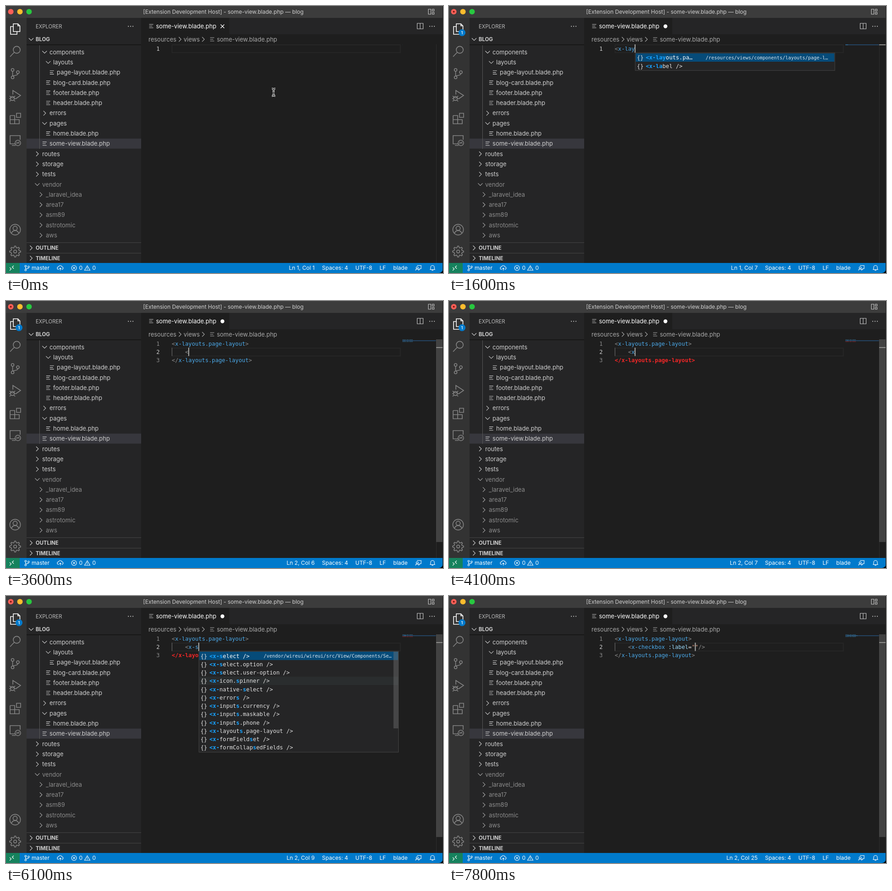
An HTML page for the animation above (8 s loop, 957x585 px).

```html
<!DOCTYPE html>
<html lang="en">
<head>
<meta charset="utf-8">
<title>Editor autocompletion</title>
<style>
  html, body { margin: 0; height: 100%; overflow: hidden; background: #1e1e1e; }
  svg { display: block; width: 100vw; height: 100vh; }
  text { font-family: Inter, Roboto, sans-serif; white-space: pre; }
  .mono { font-family: "DejaVu Sans Mono", "Liberation Mono", monospace; }
</style>
</head>
<body>
<svg viewBox="0 0 957 585"><g id="frame"></g><g id="live"></g></svg>
<script>
const LOOP = 8000, BLINK = 500;
const CODE = 12.175, CHAR = 7.33, ROW = 18.26, CODE_X = 363, TOP = 84;

const esc = s => s.replace(/&/g, '&amp;').replace(/</g, '&lt;');
const rect = (x, y, w, h, fill, extra = '') =>
  `<rect x="${x}" y="${y}" width="${w}" height="${h}" fill="${fill}" ${extra}/>`;
const dot = (x, y, r, fill) => `<circle cx="${x}" cy="${y}" r="${r}" fill="${fill}"/>`;
const text = (x, y, html, { size = 13, fill = '#d0d0d0', weight = 400, anchor = 'start', cls = '' } = {}) =>
  `<text class="${cls}" x="${x}" y="${y + size * 0.36}" font-size="${size}" fill="${fill}" font-weight="${weight}" text-anchor="${anchor}">${html}</text>`;
const mono = (x, y, html, options) => text(x, y, html, { size: CODE, fill: '#e2e2e2', cls: 'mono', ...options });
const icon = (x, y, d, color = '#ccc', width = 1.1) =>
  `<path transform="translate(${x} ${y})" d="${d}" fill="none" stroke="${color}" stroke-width="${width}"/>`;
const ring = (x, y, r) => `M${x - r} ${y}a${r} ${r} 0 1 0 ${2 * r} 0a${r} ${r} 0 1 0 ${-2 * r} 0`;

const RIGHT = 'M-2.5-5L2.5 0L-2.5 5', DOWN = 'M-5-2.5L0 2.5L5-2.5';
const FILE = 'M-4.5-3.8h9M-4.5 0h7M-4.5 3.8h9';
const ellipsis = (x, y) => [-5, 0, 5].map(d => dot(x + d, y, 1.1, '#ccc')).join('');

function gear() {
  const points = [];
  for (let i = 0; i < 32; i++) {
    const radius = i % 4 < 2 ? 12 : 8.8, angle = (i - 0.5) * Math.PI / 16;
    points.push(`${(radius * Math.cos(angle)).toFixed(2)} ${(radius * Math.sin(angle)).toFixed(2)}`);
  }
  return `M${points.join('L')}Z` + ring(0, 0, 3.2);
}

// depth, kind (v open, > closed, = file), name
const TREE = `2v components|3v layouts|4= page-layout.blade.php|3= blog-card.blade.php|3= footer.blade.php|3= header.blade.php|2> errors|2v pages|3= home.blade.php|2= some-view.blade.php|0> routes|0> storage|0> tests|0v vendor|1> _laravel_idea|1> area17|1> asm89|1> astrotomic|1> aws`.split('|');

function tree() {
  return TREE.map((entry, i) => {
    const x = 79 + 8 * entry[0], y = 101 + 22.3 * i, ignored = i >= 13;
    const shape = { v: DOWN, '>': RIGHT, '=': FILE }[entry[1]];
    return icon(x - 10.5, y, shape, ignored ? '#aaa' : '#ccc') +
      text(x + 0.3, y, entry.slice(3), ignored ? { fill: '#8c8c8c' } : {});
  }).join('');
}

function activityBar() {
  const icons = [
    [99, ring(3.5, -3, 7.6) + 'M-2 2.5L-11 12'],
    [148, ring(-5.5, -8, 3) + ring(-5.5, 8.5, 3) + ring(6, -3, 3) + 'M-5.5-5V5.5M6 0C6 5-1 3-5 5.5'],
    [197, 'M-5-3V-12L12-1L1 6.5' + ring(-6, 5.5, 4.4) + 'M-12 0l3 3M0 0l-3 3M-13 6h3M-2 6h3M-12 12l3-3M0 12l-3-3M-10 4h8'],
    [246, 'M-11-6H-1V12M-11-6V12H9V3H-11M3-11H12V-2H3Z'],
    [294, 'M0 8H-11V-10H11V-1M-7 11.5H1' + ring(6, 6, 6) + 'M3 4l2 2-2 2M9 3.5l-2 2 2 2'],
    [490, ring(0, 0, 11.6) + ring(0, -3, 4.6) + 'M-8 8.4C-6 0 6 0 8 8.4'],
    [538, gear()]
  ];
  return icon(20, 50, 'M-4 6V-11H6L10.5-6.5V6ZM6-11V-6.5H10.5M-4-5H-10V12H4V6', '#fff', 1.6) +
    icons.map(([y, d]) => icon(20, y, d, '#858585', 1.6)).join('');
}

function statusBar() {
  const label = (x, s) => text(x, 574, s, { size: 12.1, fill: '#fff' });
  const mark = (x, d) => icon(x, 574, d, '#fff');
  return rect(0, 563, 957, 22, '#007acc') + rect(0, 563, 30, 22, '#16825d') +
    mark(12.5, 'M-4.5-1l3.5 3-3.5 3.5M4.5-5l-3.5 3 3.5 3.5') +
    mark(46, ring(-3, -4, 1.8) + ring(-3, 4.5, 1.8) + ring(3.5, -2.5, 1.8) + 'M-3-2V2.5M3.5-.5C3.5 2-2 1-3 2.5') + label(56, 'master') +
    mark(119, 'M-3 3h-1a2.7 2.7 0 0 1 0-5.5a4 4 0 0 1 7.6 0a2.8 2.8 0 0 1 .4 5.5h-1M0 5.5V0M-2 2L0 0L2 2') +
    mark(149, ring(0, 0, 5.5) + 'M-2.2-2.2L2.2 2.2M2.2-2.2L-2.2 2.2') + label(160, '0') +
    mark(178, 'M0-5L6 5H-6ZM0-1.5V2M0 3v1') + label(189, '0') +
    label(692, 'Spaces: 4') + label(765, 'UTF-8') + label(818, 'LF') + label(848, 'blade') +
    mark(903, 'M-3-5.5H6V1.5H4L2 3.5V1.5' + ring(-2.5, -0.5, 2.2) + 'M-6 5.5C-6 1 1 1 1 5.5') +
    mark(934, 'M-5 3.5L-4 1V-1.5A4 4 0 0 1 4-1.5V1L5 3.5ZM-1.5 4a1.5 1.5 0 0 0 3 0');
}

function staticFrame() {
  const heading = (y, s) => text(65, y, s, { size: 11.4, weight: 700 });
  const crumb = (x, s) => text(x, 73.5, s, { fill: '#a9a9a9' });
  return rect(0, 0, 957, 585, '#1e1e1e') + rect(0, 0, 957, 26, '#3c3c3c') +
    dot(10.5, 12.5, 6, '#ff5f57') + dot(30.5, 12.5, 6, '#febc2e') + dot(50.5, 12.5, 6, '#28c840') +
    text(476, 12.5, '[Extension Development Host] - some-view.blade.php — blog', { size: 12.05, anchor: 'middle' }) +
    icon(931, 12.5, 'M-6-5.5H-.5V5.5H-6ZM2.5-5.5H6.5V-1.5H2.5ZM2.5 1.5H6.5V5.5H2.5Z') +
    rect(0, 26, 45, 537, '#333') + rect(45, 26, 251, 537, '#252526') + activityBar() +
    text(65, 44.5, 'EXPLORER', { size: 11.3, fill: '#bbb' }) + ellipsis(273, 44.5) +
    rect(45, 290.5, 251, 22, '#37373d') + rect(73, 86, 1, 227, '#585858') + tree() +
    rect(45, 84, 251, 2, '#171717') + icon(55, 73, DOWN) + heading(73, 'BLOG') +
    rect(45, 518, 251, 1, '#454545') + icon(55, 530, RIGHT) + heading(530, 'OUTLINE') +
    rect(45, 541, 251, 1, '#454545') + icon(55, 552.5, RIGHT) + heading(552.5, 'TIMELINE') +
    rect(489, 26, 468, 36, '#252526') + icon(318, 44, FILE) +
    text(328.5, 44, 'some-view.blade.php', { fill: '#fff' }) +
    icon(907, 44, 'M-6.5-6H6.5V6H-6.5ZM0-6V6') + ellipsis(933, 44.5) +
    crumb(312, 'resources') + icon(381, 73, RIGHT, '#a9a9a9') +
    crumb(389, 'views') + icon(432, 73, RIGHT, '#a9a9a9') +
    icon(451.5, 73, FILE, '#a9a9a9') + crumb(461.7, 'some-view.blade.php') +
    rect(942, TOP, 1, 479, '#2d2d2d') + statusBar() + rect(956, 0, 1, 585, '#161616') +
    '<path d="M957 576A9 9 0 0 1 948 585H957Z"/>';
}

const tags = names => names.split(' ').map(name => `<x-${name} />`);
const WIRE = '/vendor/wireui/wireui/src/View/Components/';
const ALL = { items: tags('blog-card button button.circle card checkbox datetime-picker dialog dropdown dropdown.header dropdown.item dynamic-component error'), thumb: 68 };
const WITH_S = { items: tags('select select.option select.user-option icon.spinner native-select errors inputs.currency inputs.maskable inputs.phone layouts.page-layout formFieldset formCollapsedFields'), thumb: 168 };
const WITH_L = { items: tags('label layouts.page-layout blog-card dialog modal') };
const WITH_LA = { items: tags('layouts.page-layout label') };
const WITH_C = { items: tags('card checkbox button.circle icon.check') };
const WITH_CH = { items: tags('checkbox icon.check') };
const PROPS = { items: [':label', ':left-label', ':lg', ':md'] };

const OPEN = '<x-layouts.page-layout>', CLOSE = '</x-layouts.page-layout>';
const single = (typed, list) => ({ lines: [typed], ln: 1, col: typed.length, list, query: typed, pick: 0 });
const nested = (before, list, after = '') => ({
  lines: [OPEN, '    ' + before + after, CLOSE], ln: 2, col: 4 + before.length,
  list, query: before.split(' ').pop(), pick: 0
});
// Quiet steps leave the cursor's blink phase alone.
const pick = index => ({ pick: index, quiet: true });

const STEPS = [
  [-500, single('')],
  [100, single('<')],
  [300, single('<x')],
  [600, single('<x-')],
  [700, { list: ALL, quiet: true }],
  [1000, single('<x-l', WITH_L)],
  [1300, single('<x-la', WITH_LA)],
  [1500, single('<x-lay', WITH_LA)],
  [2100, { lines: [OPEN + CLOSE], col: 23, list: null }],
  [2500, { lines: [OPEN, CLOSE], ln: 2, col: 0 }],
  [2900, { lines: [OPEN, '', CLOSE], ln: 3 }],
  [3300, { ln: 2 }],
  [3400, nested('')],
  [3600, nested('<')],
  [3900, nested('<x')],
  [4300, nested('<x-', ALL)],
  [4600, pick(1)],
  [4800, pick(2)],
  [4900, pick(1)],
  [5000, pick(0)],
  [5900, nested('<x-s', WITH_S)],
  [6300, nested('<x-c', WITH_C)],
  [6400, nested('<x-ch', WITH_CH)],
  [6800, nested('<x-checkbox ', null, '/>')],
  [7200, nested('<x-checkbox :', null, '/>')],
  [7300, { list: PROPS, quiet: true }],
  [7600, nested('<x-checkbox :label="', null, '"/>')]
];

function stateAt(time) {
  const state = {};
  for (const [start, change] of STEPS) {
    if (start > time) break;
    Object.assign(state, change);
    if (!change.quiet) state.typedAt = start;
  }
  return state;
}

const TOKEN = /(<\/?|\/?>)|(x-?[\w.-]*)|(:[\w-]*)|("[^"]*")|(\s+|.)/g;
const TOKEN_COLORS = ['#8c8c8c', '#4cabec', '#9cdcfe', '#ce9178', '#d4d4d4'];
const colored = line => line.replace(TOKEN, (token, ...groups) => {
  const kind = groups.slice(0, 5).findIndex(group => group !== undefined);
  return `<tspan fill="${TOKEN_COLORS[kind]}">${esc(token)}</tspan>`;
});

// Emphasises the first in-order occurrence of every typed character.
function matched(label, query) {
  let next = 0, html = '';
  for (const char of label) {
    const hit = char === query[next];
    if (hit) next++;
    html += hit ? `<tspan fill="#18a3ff" font-weight="700">${esc(char)}</tspan>` : esc(char);
  }
  return html;
}

function detailFor(item) {
  if (item.includes('blog-card')) return '/resources/views/components/blog-card.blad…';
  if (item.includes('layouts')) return '/resources/views/components/layouts/page-l…';
  const name = item.slice(3);
  return item[0] === '<' ? WIRE + name[0].toUpperCase() + name[1] + '…' : '';
}

function popup({ list, query, pick, ln, col }) {
  const x = CODE_X + col * CHAR + 0.9, y = TOP + ln * ROW + 0.5;
  const height = list.items.length * ROW + 2;
  const rows = list.items.map((item, i) => {
    const top = y + 1 + i * ROW, middle = top + ROW / 2;
    const chosen = i === pick, hovered = top < 187 && top + ROW > 187;
    const detail = chosen ? detailFor(item) : '';
    const label = detail && item.length > 14 ? item.slice(0, 13) + '…' : item;
    const back = chosen ? '#064b79' : hovered ? '#2a2d2e' : 'none';
    return rect(x + 1, top, 435, ROW, back) + mono(x + 3.5, middle, '{}') +
      mono(x + 23, middle, matched(label, query), { fill: chosen ? '#fff' : '#e2e2e2' }) +
      mono(x + 422, middle, detail, { size: 10.35, fill: '#dbe6ee', anchor: 'end' });
  }).join('');
  const thumb = list.thumb ? rect(x + 426, y + 1, 10.5, list.thumb, 'rgba(121,121,121,.4)') : '';
  return rect(x, y, 437, height, '#252526') + rows + thumb +
    rect(x, y, 437, height, 'none', 'stroke="#454545"');
}

function editor(state, time) {
  const { lines, ln, col, list } = state;
  const count = lines.length, currentTop = TOP + (ln - 1) * ROW;
  const unclosed = /<x[^>]*$/.test(lines[1] || '');
  let out = rect(CODE_X + 0.5, currentTop + 1, 500, ROW - 1, 'none', 'stroke="#282828" stroke-width="1.6"');
  if (lines[0]) out += rect(868, TOP + 2 * (ln - 1), 73.5, 2, '#264f78', 'opacity=".75"');

  lines.forEach((line, i) => {
    const y = TOP + (i + 0.5) * ROW, broken = unclosed && i === 2;
    out += mono(336.5, y, i + 1, { anchor: 'end', fill: i + 1 === ln ? '#d0d0d0' : '#8c8c8c' });
    out += broken ? mono(CODE_X, y, esc(line), { fill: '#f32727', weight: 700 }) : mono(CODE_X, y, colored(line));
    const indent = line.length - line.trimStart().length;
    if (indent) out += rect(CODE_X, TOP + i * ROW, 1, ROW, '#707070');
    out += `<path d="M${868 + indent} ${TOP + 1 + 2 * i}h${line.length - indent}" stroke="${broken ? '#b52a2a' : '#3a81b0'}" stroke-width="1.2" stroke-dasharray="8 1 5 1" opacity=".75"/>`;
  });

  const view = 478, scale = view / (view + (count - 1) * ROW);
  if (count > 1) out += rect(942, TOP, 14, view * scale, 'rgba(121,121,121,.4)');
  if (lines[0]) out += rect(942, TOP + (ln - 1) * ROW * scale, 14, 2, '#8f8f8d');
  if ((time - state.typedAt) % (2 * BLINK) < BLINK) out += rect(CODE_X + col * CHAR - 0.5, currentTop, 2, ROW, '#aeafad');
  return list ? out + popup(state) : out;
}

function mouse(x, y) {
  const beam = 'M-4-8C-1-8 0-7 0-5.5C0-7 1-8 4-8M0-6V6M-4 8C-1 8 0 7 0 5.5C0 7 1 8 4 8M-2 1.5H2';
  return icon(x, y, beam, '#fff', 3.6) + icon(x, y, beam, '#111', 1.3);
}

function draw(time) {
  const state = stateAt(time), dirty = state.lines[0] !== '';
  const marks = dirty
    ? dot(10.5, 12.5, 2, '#7e1812') + dot(474, 44.5, 4.2, '#fff') + dot(28.5, 58.5, 7.6, '#007acc') +
      text(28.5, 58.5, '1', { size: 9, weight: 600, fill: '#fff', anchor: 'middle' })
    : icon(474, 44.5, 'M-4-4L4 4M4-4L-4 4', '#fff', 1.3) + mouse(586, 189);
  return editor(state, time) + marks +
    text(676, 574, `Ln ${state.ln}, Col ${state.col + 1}`, { size: 12.1, fill: '#fff', anchor: 'end' });
}

document.getElementById('frame').innerHTML = staticFrame();
const live = document.getElementById('live');
let shown = '';
const began = performance.now();
function tick() {
  const picture = draw((performance.now() - began) % LOOP);
  if (picture !== shown) live.innerHTML = shown = picture;
  requestAnimationFrame(tick);
}
tick();
</script>
</body>
</html>
```
